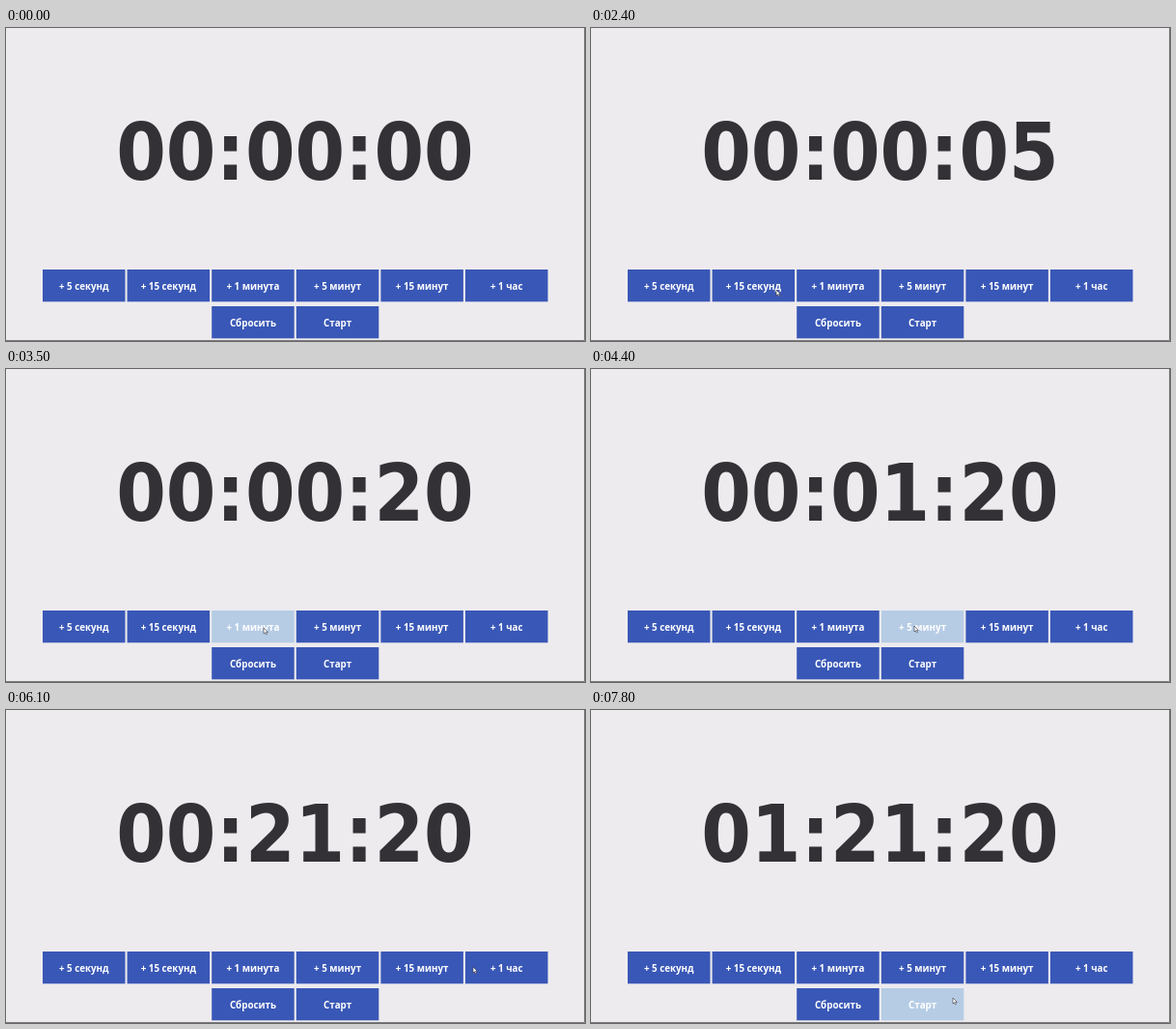
These frames come from a looping animation (600x324 px, 8000 ms). An HTML page:

```html
<!DOCTYPE html>
<html lang="ru">
<head>
<meta charset="utf-8">
<title>Таймер</title>
<style>
  html, body { margin: 0; width: 100%; height: 100%; overflow: hidden; background: #edebee; }
  svg { display: block; width: 600px; height: 324px; }
  text { text-anchor: middle; }
  #clock text { font: bold 82.5px "DejaVu Sans", Verdana, sans-serif; font-stretch: condensed; fill: #333135; }
  .button rect { fill: #3957b6; }
  .button text { font: bold 9.8px "Open Sans", "Noto Sans", sans-serif; fill: #fff; }
  .button.pressed rect { fill: #b6cce5; }
</style>
</head>
<body>
<svg viewBox="0 0 600 324">
  <path d="M599.5 0V323.5H0" fill="none" stroke="#7b7a7d"/>
  <g id="clock"></g>
  <g id="buttons"></g>
  <path id="cursor" d="M0 0V6L1.4 4.8L2.4 6.9L3.4 6.4L2.5 4.4H4.4Z"
        fill="#fff" stroke="#30323c" stroke-width=".6"/>
</svg>
<script>
const LOOP = 8000, STEP = 100;
const TRAVEL = 600, DWELL = 200, FLASH = 100;
const NS = "http://www.w3.org/2000/svg";
const byId = id => document.getElementById(id);

// label: seconds added per press
const actions = {
  "+ 5 секунд": 5, "+ 15 секунд": 15, "+ 1 минута": 60,
  "+ 5 минут": 300, "+ 15 минут": 900, "+ 1 час": 3600,
  "Сбросить": 0, "Старт": 0
};
const labels = Object.keys(actions);

// Pointer arrivals; a stop with a label ends in a press.
const stops = [
  { at: 900, x: 366, y: 252 },
  { at: 1500, x: 97, y: 269, press: "+ 5 секунд" },
  { at: 2400, x: 192, y: 271, press: "+ 15 секунд" },
  { at: 3300, x: 267, y: 268, press: "+ 1 минута" },
  { at: 4200, x: 335, y: 266, press: "+ 5 минут" },
  { at: 5200, x: 430, y: 268, press: "+ 15 минут" },
  { at: 6100, x: 484, y: 266 },
  { at: 6200, x: 528, y: 264, press: "+ 1 час" },
  { at: 7500, x: 375, y: 298, press: "Старт" }
];

function add(parent, tag, attrs, text = "") {
  const el = document.createElementNS(NS, tag);
  for (const key in attrs) el.setAttribute(key, attrs[key]);
  el.textContent = text;
  return parent.appendChild(el);
}

// Three pairs of digits with a colon after each of the first two.
const glyphs = Array.from({ length: 8 }, (_, i) => {
  const x = 140.2 + Math.floor(i / 3) * 133.6 + [0, 51.5, 92.4][i % 3];
  return add(byId("clock"), "text", { x, y: 156.6 });
});

const buttons = labels.map((label, i) => {
  const x = 38 + (i < 6 ? i : i - 4) * 87.6;
  const y = i < 6 ? 250 : 288;
  const g = add(byId("buttons"), "g", { class: "button" });
  add(g, "rect", { x, y, width: 85.5, height: 33.3 });
  add(g, "text", { x: x + 42.75, y: y + 20.5 }, label);
  return g;
});

const two = n => String(Math.floor(n)).padStart(2, "0");
const format = s => [s / 3600, s / 60 % 60, s % 60].map(two).join(":");

function pointerAt(t) {
  let { x, y, at } = stops[0];
  for (const stop of stops.slice(1)) {
    const from = Math.max(at, stop.at - TRAVEL);
    const u = Math.min(1, Math.max(0, (t - from) / (stop.at - from)));
    const k = u * u * (3 - 2 * u);
    x += (stop.x - x) * k;
    y += (stop.y - y) * k;
    at = stop.at;
  }
  return [x, y];
}

function draw(time) {
  const t = Math.floor(time % LOOP / STEP) * STEP;
  let total = 0, active = "";
  for (const { at, press } of stops) {
    const age = t - at - DWELL;
    if (!press || age < 0) continue;
    if (age < FLASH || press === "Старт") active = press;
    else total += actions[press];
  }
  const digits = format(total);
  glyphs.forEach((g, i) => { g.textContent = digits[i]; });
  buttons.forEach((b, i) => b.classList.toggle("pressed", labels[i] === active));

  const cursor = byId("cursor");
  cursor.style.display = t < stops[0].at ? "none" : "";
  cursor.setAttribute("transform", `translate(${pointerAt(t)})`);
}

const start = performance.now();
function tick() {
  draw(performance.now() - start);
  requestAnimationFrame(tick);
}
tick();
</script>
</body>
</html>
```
